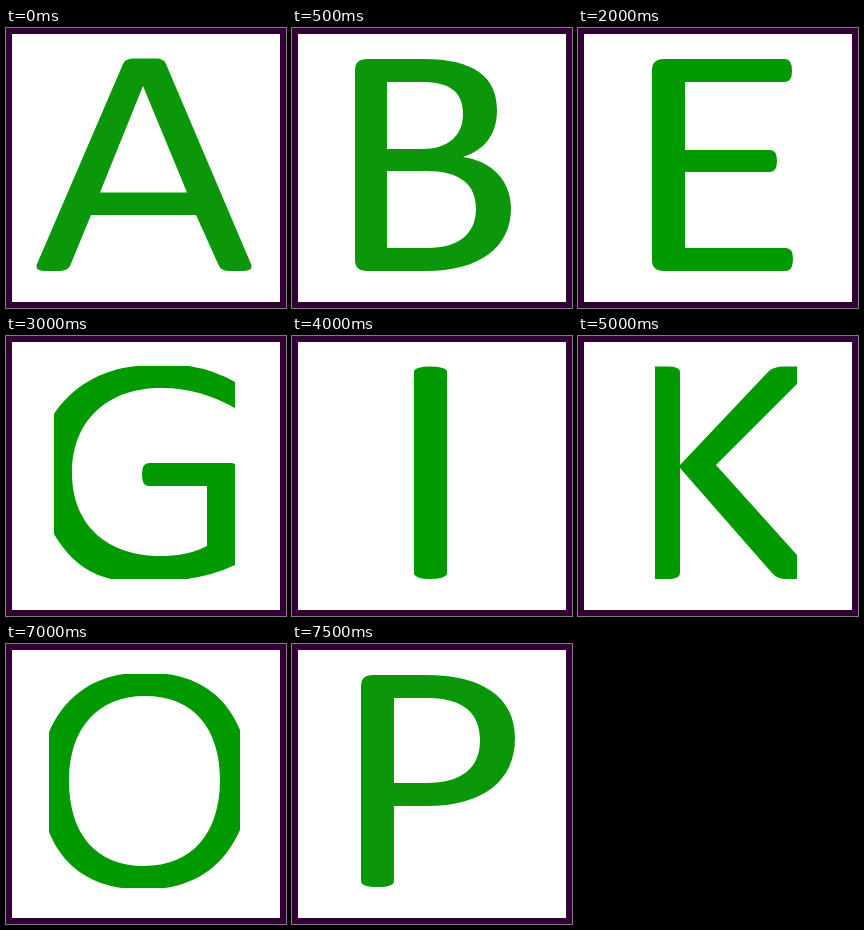
Animation of 280 by 280 pixels, one loop 8000 ms. Source, as an HTML page:

```html
<!DOCTYPE html>
<html lang="en">
<head>
<meta charset="utf-8">
<title>Alphabet</title>
<style>
  html, body { margin: 0; width: 100%; height: 100%; overflow: hidden; background: #303; }
  svg { display: block; width: 100vw; height: 100vh; }
  path {
    fill: #090;
    fill-rule: evenodd;
    visibility: hidden;
    animation: show 8s step-end infinite;
    animation-delay: calc(var(--i) * .5s - 8s);
  }
  .soft { fill: #0a980a; }
  /* each letter holds one sixteenth of the loop */
  @keyframes show {
    0% { visibility: visible; }
    6.25%, 100% { visibility: hidden; }
  }
</style>
</head>
<body>
<svg viewBox="0 0 280 280">
  <rect width="280" height="280" fill="#303"/>
  <rect x="6" y="6" width="268" height="268" fill="#fff"/>
  <!-- A -->
  <path class="soft" style="--i:0" d="M117 36Q119 30.5 128 30.5H150Q158 30.5 160 36L245 236Q248 243 236 243H224Q215 243 213 238L190 187H85L64 238Q62 243 52 243H40Q28 243 31 236ZM137 58L94 164.5H181Z"/>
  <!-- B -->
  <path class="soft" style="--i:1" d="M63 42Q63 31 75 31H132C182 31 205 49 205 82C205 106 193 122 171 129C200 133 219 153 219 180C219 220 187 243 134 243H75Q63 243 63 232ZM95 54H130C158 54 171 64 171 86C171 108 156 121 130 121H95ZM95 143H134C168 143 184 156 184 181C184 206 166 220 136 220H95Z"/>
  <!-- C -->
  <path class="soft" style="--i:2" d="M234 47C218 36 200 30 182 28H137C96 32 67 51 51 81V194C66 224 96 242 136 245H181C200 243 219 237 234 227V199C213 213 190 221 165 221C111 221 77 189 77 137C77 85 112 52 165 52C190 52 213 60 234 74Z"/>
  <!-- D -->
  <path class="soft" style="--i:3" d="M52 38Q52 31 62 31H126C178 31 215 50 233 88V183C215 222 178 242 122 242H62Q52 242 52 236ZM83 54H122C180 54 207 84 207 135C207 190 178 219 122 219H83Z"/>
  <!-- E -->
  <path style="--i:4" d="M74 42Q74 31 86 31H207Q214 31 214 43Q214 54 207 54H107V122H192Q199 122 199 133Q199 144 192 144H107V220H208Q215 220 215 231Q215 243 208 243H86Q74 243 74 232Z"/>
  <!-- F -->
  <path style="--i:5" d="M76 42Q76 31 88 31H208Q215 31 215 43Q215 54 208 54H109V127H200Q207 127 207 138Q207 150 200 150H109V238Q107 244 93 244Q78 244 76 238Z"/>
  <!-- G -->
  <path style="--i:6" d="M229 46Q208 34 183 30H130C94 34 66 51 48 78V198C62 222 80 237 105 243H181Q208 239 229 229V128L226 127H143Q136 127 136 138Q136 150 142 150H201V210C185 218 170 220 155 220C100 220 66 188 66 137C66 84 102 52 155 52C185 52 207 60 229 72Z"/>
  <!-- H -->
  <path style="--i:7" d="M50 36Q52 30.5 66 30.5Q80 30.5 82 36V122H196V36Q198 30.5 212 30.5Q226 30.5 228 36V238Q226 243.5 212 243.5Q198 243.5 196 238V145H82V238Q80 243.5 66 243.5Q52 243.5 50 238Z"/>
  <!-- I -->
  <path style="--i:8" d="M122 35Q124 30.5 138 30.5Q153 30.5 155 35V238Q153 243 138 243Q124 243 122 238Z"/>
  <!-- J -->
  <path style="--i:9" d="M136 36Q138 30.5 152 30.5Q167 30.5 169 36V181C169 225 150 246 112 246C96 246 83 243 78 238Q76 235 76 228Q76 215 81 216C89 220 98 223 109 223C128 223 136 210 136 182Z"/>
  <!-- K -->
  <path style="--i:10" d="M77 30.5H90Q102 30.5 102 36V129L190 36Q195 30.5 206 30.5H219V48L138 129L219 219V243H208Q199 243 194 237L102 132V237Q102 243 90 243H77Z"/>
  <!-- L -->
  <path style="--i:11" d="M84 36Q86 30.5 100 30.5Q115 30.5 117 36V219H208Q215 219 215 231Q215 243 208 243H96Q84 243 84 232Z"/>
  <!-- M -->
  <path style="--i:12" d="M50 45Q50 31 64 31H74Q88 31 93 43L145 202L198 43Q203 31 215 31H227Q240 31 240 45V237Q240 243 229 243Q217 243 217 237V54H216L157 237Q155 243 145 243Q134 243 132 237L73 54H72V237Q72 243 61 243Q50 243 50 237Z"/>
  <!-- N -->
  <path style="--i:13" d="M43 43Q43 31 56 31H68Q80 31 87 42L201 205V36Q203 31 216 31Q229 31 231 36V231Q231 243 218 243H209Q199 243 191 232L73 64V238Q71 243 58 243Q45 243 43 238Z"/>
  <!-- O -->
  <path style="--i:14" d="M43 88C58 54 84 35 118 30H161C196 35 221 54 234 86V186C219 220 193 239 159 244H116C81 239 56 220 43 188ZM139 52C92 52 63 84 63 137C63 190 90 222 138 222C186 222 214 189 214 136C214 84 187 52 139 52Z"/>
  <!-- P -->
  <path class="soft" style="--i:15" d="M69 42Q69 31 81 31H134C190 31 223 53 223 94C223 138 190 162 135 162H102V237Q102 243 86 243Q69 243 69 237ZM102 54H136C172 54 188 70 188 96C188 124 170 139 134 139H102Z"/>
</svg>
</body>
</html>
```
